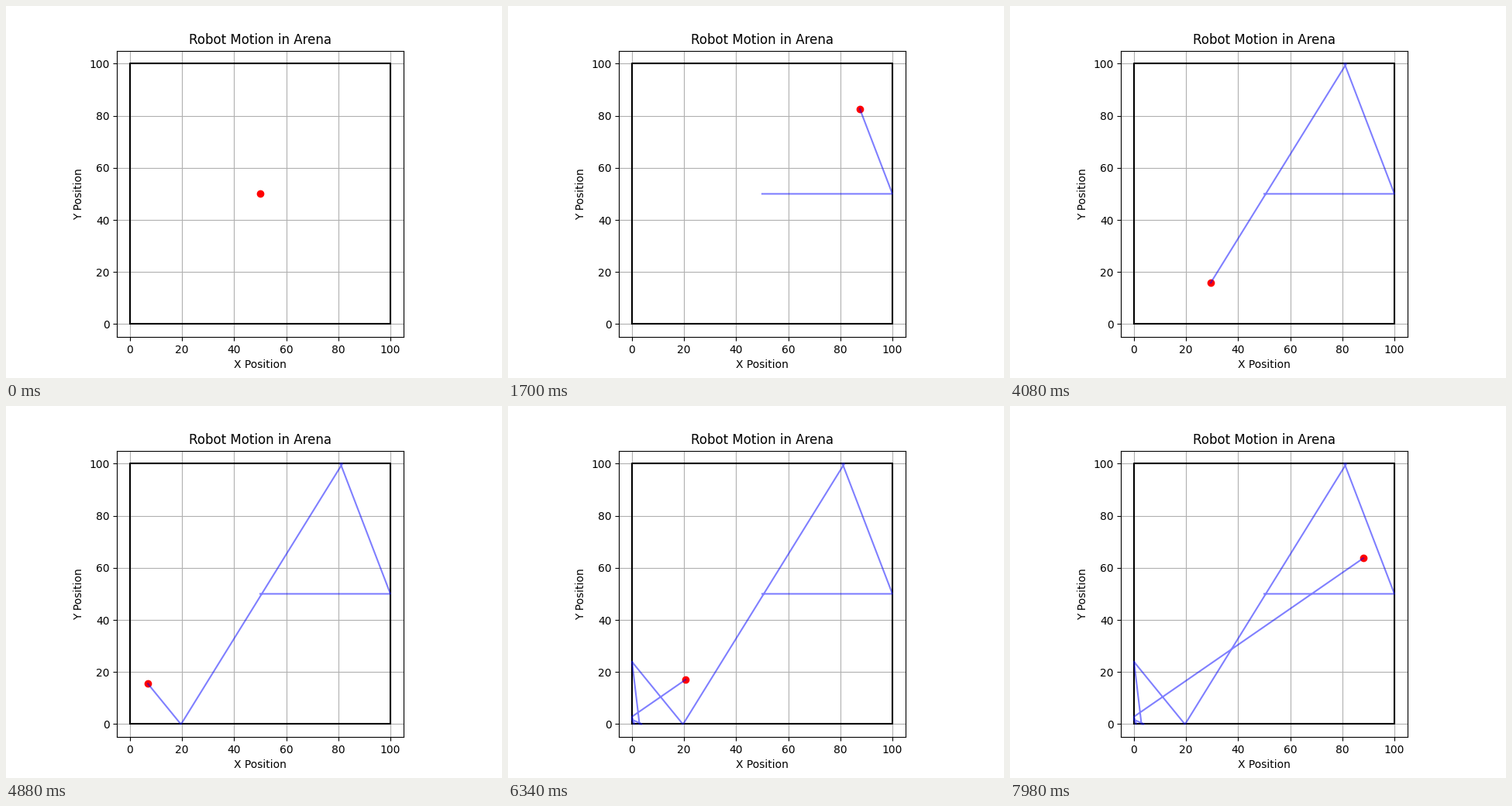
Recreate the animation shown at these times as a matplotlib script. Size 640x480 px, loop 8000 ms.

```python
import numpy as np
import matplotlib.pyplot as plt
from matplotlib.animation import FuncAnimation

SIZE = 100
FRAMES = 400
INTERVAL = 20

# Heading in degrees; the robot takes the next one each time it meets a wall.
HEADINGS = [0, 110.98, 27, 238.24, 273, 129.2, -83.2, -35,
            155.8, -73, 109, 34.65]


def walk(count):
    """Unit steps from the arena's centre, kept inside the walls."""
    pos = np.array([SIZE / 2, SIZE / 2])
    path = [pos]
    turns = iter(HEADINGS)
    angle = np.radians(next(turns))
    for _ in range(count - 1):
        moved = pos + [np.cos(angle), np.sin(angle)]
        pos = np.clip(moved, 0, SIZE)
        path.append(pos)
        if np.any(moved <= 0) or np.any(moved >= SIZE):
            angle = np.radians(next(turns))
    return np.array(path)


path = walk(FRAMES)

fig, ax = plt.subplots(figsize=(6.4, 4.8), dpi=100)
ax.set_xlim(-5, SIZE + 5)
ax.set_ylim(-5, SIZE + 5)
ax.set_aspect("equal")
ax.grid(True)
ax.set_title("Robot Motion in Arena")
ax.set_xlabel("X Position")
ax.set_ylabel("Y Position")

ax.plot([0, SIZE, SIZE, 0, 0], [0, 0, SIZE, SIZE, 0], "k-")
robot, = ax.plot([], [], "ro")
trail, = ax.plot([], [], "b-", alpha=0.5)


def update(i):
    robot.set_data(path[i:i + 1, 0], path[i:i + 1, 1])
    trail.set_data(path[:i + 1, 0], path[:i + 1, 1])
    return robot, trail


anim = FuncAnimation(fig, update, frames=FRAMES, interval=INTERVAL,
                     init_func=lambda: update(0), blit=True, repeat=True)
plt.show()
```
